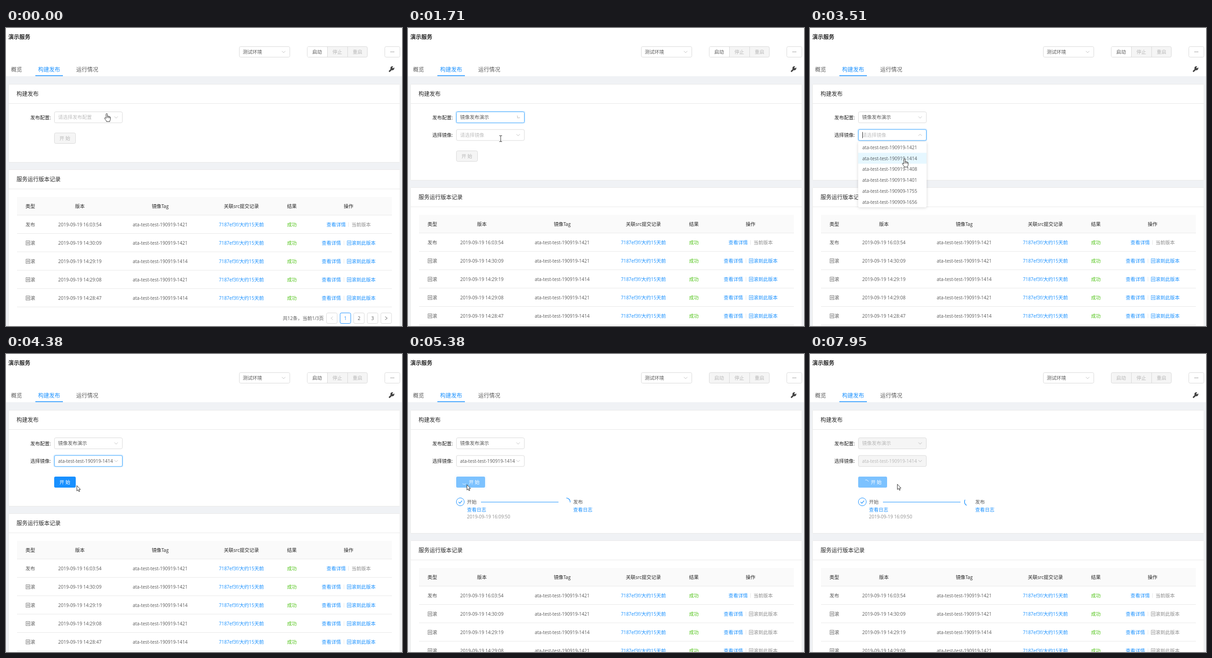
These frames come from a looping animation (863x649 px, 8000 ms). An HTML page:

```html
<!DOCTYPE html>
<html lang="zh-CN">
<head>
<meta charset="utf-8">
<title>演示服务</title>
<style>
html, body { margin: 0; width: 100%; height: 100%; overflow: hidden; background: #f0f2f5; }
svg { display: block; width: 863px; height: 649px; }
text { font-family: "Open Sans", "Noto Sans CJK SC", "Noto Sans CJK", "Noto Sans CJK JP", sans-serif; white-space: pre; }
.drop { filter: drop-shadow(0 1.5px 3px rgba(0,0,0,.16)); }
</style>
</head>
<body>
<svg id="stage" viewBox="0 0 863 649" xmlns="http://www.w3.org/2000/svg">
  <g id="page"></g>
  <g id="head"></g>
  <g id="build"></g>
  <g id="log"></g>
  <g id="form"></g>
  <g id="pointer"></g>
</svg>
<script>
const LOOP = 8000;
const BLUE = '#1890ff', HOVER = '#40a9ff', LINE = '#e8e8e8', EDGE = '#d9d9d9', GREY = '#f5f5f5';
const DARK = 'rgba(0,0,0,.85)', BODY = 'rgba(0,0,0,.65)', SOFT = 'rgba(0,0,0,.45)', PALE = 'rgba(0,0,0,.25)';
const $ = id => document.getElementById(id);

// moments at which the interface changes
const AT = {
  hover: 190, open1: 400, second: 1090, pick1: 1500, open2: 2300, third: 3370,
  pick2: 3590, load: 5000, steps: 5310, lock: 5460
};

// y is the visual middle of the line
function text(x, y, s, { size = 10.5, fill = BODY, anchor = 'start', weight = 400 } = {}) {
  const runs = s.replace(/[\x20-\x7e]+/g, m => `<tspan font-size="${size * .952}">${m}</tspan>`);
  return `<text x="${x}" y="${y + size * .37}" font-size="${size}" fill="${fill}" text-anchor="${anchor}" font-weight="${weight}">${runs}</text>`;
}
const mid = (x, y, s, o) => text(x, y, s, { anchor: 'middle', ...o });
const rect = (x, y, w, h, fill, stroke = 'none', r = 0) =>
  `<rect x="${x}" y="${y}" width="${w}" height="${h}" rx="${r}" fill="${fill}" stroke="${stroke}"/>`;
const path = (d, stroke, width = 1, more = '') =>
  `<path d="${d}" fill="none" stroke="${stroke}" stroke-width="${width}" ${more}/>`;
const hline = (x1, x2, y, c = LINE) => path(`M${x1} ${y}H${x2}`, c);
const chevron = (x, y, turn = 0) =>
  path('M-3.7 -1.9L0 1.9L3.7 -1.9', 'rgba(0,0,0,.28)', .9, `transform="translate(${x} ${y}) rotate(${turn})"`);
const clamp = v => Math.max(0, Math.min(1, v));
const span = (t, from, length) => clamp((t - from) / length);
const smooth = p => p * p * (3 - 2 * p);

function drawPage() {
  const wrench =
    path('M835.8 94.2L841 89', '#444', 3.2, 'stroke-linecap="round"') +
    '<circle cx="842" cy="87.6" r="4.3" fill="#444"/>' +
    path('M842.6 87L847 82.6', '#fff', 2.8);
  const dots = [839, 842, 845].map(x => `<circle cx="${x}" cy="52" r=".8" fill="#555"/>`).join('');
  $('page').innerHTML =
    rect(0, 0, 863, 649, '#f0f2f5') + rect(0, 0, 863, 105, '#fff') +
    text(5, 20, '演示服务', { size: 12, fill: DARK, weight: 700 }) +
    text(11, 91, '概览', { size: 12 }) +
    text(70, 91, '构建发布', { size: 12, fill: BLUE }) +
    text(153, 91, '运行情况', { size: 12 }) +
    rect(64, 103, 60, 1.6, BLUE) +
    rect(508.5, 40.5, 110, 23, '#fff', EDGE, 3) +
    text(516, 52, '测试环境') + chevron(605, 52) +
    rect(825.5, 40.5, 33, 23, '#fff', EDGE, 3) + dots + wrench;
}

function drawHead(busy) {
  $('head').innerHTML =
    rect(656.5, 40.5, 131, 23, GREY, EDGE, 3) +
    (busy ? '' : rect(657, 41, 43, 22, '#fff', 'none', 2)) +
    path('M700.5 40.5V63.5M744.5 40.5V63.5', EDGE) +
    mid(678, 52, '启动', { fill: busy ? PALE : BODY }) +
    mid(722, 52, '停止', { fill: PALE }) +
    mid(766, 52, '重启', { fill: PALE });
}

function drawLog(shift, busy) {
  const cols = [53, 161, 336, 513, 623, 746.5];
  const names = ['类型', '版本', '镜像Tag', '关联src提交记录', '结果', '操作'];
  const rows = [['16:03:54', 1421], ['14:30:09', 1421], ['14:29:19', 1414], ['14:29:08', 1421], ['14:28:47', 1414]];
  let s = rect(5.5, 308.5, 853, 360, '#fff', LINE, 1) +
    text(23, 329.5, '服务运行版本记录', { size: 12, fill: DARK }) +
    hline(6, 858, 350.5) + rect(24, 368, 817, 39, '#fafafa') + hline(24, 841, 407.5);
  names.forEach((n, i) => s += mid(cols[i], 388, n, { fill: DARK, weight: 500 }));
  rows.forEach(([time, tag], i) => {
    const y = 428 + i * 40, x = i ? 688 : 698.5;
    s += mid(cols[0], y, i ? '回滚' : '发布') +
      mid(cols[1], y, '2019-09-19 ' + time) +
      mid(cols[2], y, 'ata-test-test-190919-' + tag) +
      mid(cols[3], y, '7187ef3f/大约15天前', { fill: BLUE }) +
      mid(cols[4], y, '成功', { fill: '#52c41a' }) +
      text(x, y, '查看详情', { fill: BLUE }) +
      path(`M${i ? 736.5 : 746.5} ${y - 5}V${y + 5}`, LINE) +
      text(x + 54.5, y, i ? '回滚到此版本' : '当前版本', { fill: i && !busy ? BLUE : SOFT }) +
      hline(24, 841, y + 19.5);
  });
  s += text(603, 632, '共12条，当前1/3页');
  for (let i = 0; i < 5; i++) {
    const x = 698.5 + i * 29.6;
    s += rect(x, 620.5, 23.2, 23, '#fff', i === 1 ? BLUE : EDGE, 3);
    if (i > 0 && i < 4) s += mid(x + 11.6, 632, String(i), { fill: i === 1 ? BLUE : BODY, weight: i === 1 ? 500 : 400 });
  }
  s += path('M712.3 628.5L708.3 632L712.3 635.5', PALE) + path('M826.3 628.5L830.8 632L826.3 635.5', '#555');
  $('log').innerHTML = s;
  $('log').setAttribute('transform', `translate(0 ${shift})`);
}

function drawBuild(shift) {
  $('build').innerHTML = rect(5.5, 122.5, 853, 170 + shift, '#fff', LINE, 1) +
    text(23, 144, '构建发布', { size: 12, fill: DARK }) + hline(6, 858, 164.5);
}

function select(y, label, value, o) {
  const glow = o.focus ? path(`M107 ${y - 1}h145a2.7 2.7 0 0 1 2.7 2.7v20a2.7 2.7 0 0 1 -2.7 2.7h-145a2.7 2.7 0 0 1 -2.7 -2.7v-20a2.7 2.7 0 0 1 2.7 -2.7z`, 'rgba(24,144,255,.2)', 1.6) : '';
  return text(53, y + 12.5, label + ':', { fill: DARK }) + glow +
    rect(105.5, y, 148, 24, o.off ? GREY : '#fff', o.focus || o.hover ? HOVER : EDGE, 3) +
    text(113.5, y + 12, value, { fill: o.off ? PALE : o.hint ? '#bfbfbf' : BODY }) +
    chevron(240, y + 12, o.turn);
}

// how far a list is unfolded
function unfold(t, from, to) {
  if (t < to) return 1 - Math.pow(1 - span(t, from, 200), 5);
  return 1 - Math.pow(span(t, to, 200), 5);
}
const turn = (t, from, to) => 180 * (Math.pow(span(t, from, 300), .8) - smooth(span(t, to, 300)));

function list(y, step, items, active, open) {
  if (open <= 0) return '';
  let s = rect(0, 0, 149, step * items.length, '#fff', 'none', 3) + rect(0, step * active, 149, step, '#e6f7ff');
  items.forEach((n, i) => s += text(9, step * (i + .5), n));
  return `<g class="drop" opacity="${open}" transform="translate(105 ${y}) scale(1 ${.8 + .2 * open})">${s}</g>`;
}

function spinner(x, y, r, width, color, angle) {
  return path(`M0 ${-r}A${r} ${r} 0 0 1 ${r} 0`, color, width,
    `stroke-linecap="round" transform="translate(${x} ${y}) rotate(${angle})"`);
}

function button(t, y, over) {
  const ready = t >= AT.pick2, busy = t >= AT.load;
  if (!ready) return rect(105.5, y + .5, 46, 23, GREY, EDGE, 3) + text(116.5, y + 12.5, '开 始', { fill: PALE });
  const p = span(t, AT.load - 20, 650), g = 4.5 * (1 - Math.pow(1 - p, 3)), w = busy ? 63 : 47;
  const wave = p > 0 && p < 1
    ? `<rect x="${105 - g}" y="${y - g}" width="${w + 2 * g}" height="${24 + 2 * g}" rx="${3 + g}" fill="${BLUE}" opacity="${.2 * (1 - p) * (1 - p)}"/>` : '';
  return wave + rect(105, y, w, 24, busy ? '#7cc2ff' : over ? HOVER : BLUE, 'none', 3) +
    (busy ? spinner(122.5, y + 12, 4.9, .8, '#fff', 135 + (t - 5380) * .36) : '') +
    text(busy ? 132.5 : 116.5, y + 12.5, '开 始', { fill: '#fff' });
}

function steps(t) {
  return `<circle cx="114" cy="322" r="8.6" fill="#fff" stroke="${BLUE}"/>` +
    path('M110.3 322.2L113 325L118 319.3', BLUE, 1.2) +
    text(128.5, 322, '开始') + hline(159, 328, 322.5, BLUE) +
    text(128.5, 339, '查看日志', { fill: BLUE }) +
    text(128.5, 354.5, '2019-09-19 16:09:50', { fill: SOFT }) +
    spinner(345, 322, 8.4, 1.3, BLUE, (t - 5370) * .36) +
    text(360, 322, '发布') + text(360, 339, '查看日志', { fill: BLUE });
}

function drawForm(t, over) {
  const picked = t >= AT.pick1, chosen = t >= AT.pick2, locked = t >= AT.lock;
  let s = select(182.5, '发布配置', picked ? '镜像发布演示' : '请选择发布配置', {
    hint: !picked, off: locked, hover: t >= AT.hover && t < AT.open2,
    focus: t >= AT.open1 && t < AT.open2, turn: turn(t, AT.open1, AT.pick1)
  });
  if (picked) {
    s += select(221, '选择镜像', chosen ? 'ata-test-test-190919-1414' : '请选择镜像', {
      hint: !chosen, off: locked, hover: t >= 1750 && t < AT.load,
      focus: t >= AT.open2 && t < AT.load - 20, turn: turn(t, AT.open2, AT.pick2)
    });
    const blink = t >= AT.open2 && t < AT.pick2 && Math.floor((t - 2350) / 500) % 2 === 0;
    if (blink) s += path('M114.5 226.5V240', '#333');
  }
  s += button(t, picked ? 267 : 228, over);
  if (t >= AT.steps) s += steps(t);
  s += list(209, 24, ['演示测试环境发布', '镜像发布演示'], t < AT.second ? 0 : 1, unfold(t, AT.open1, AT.pick1));
  const tags = ['0919-1421', '0919-1414', '0919-1408', '0919-1401', '0909-1755', '0909-1656'];
  s += list(248, 23.75, tags.map(n => 'ata-test-test-19' + n), t < AT.third ? 0 : 1, unfold(t, AT.open2, AT.pick2));
  $('form').innerHTML = s;
}

// time, x, y
const route = [
  [0, 219.5, 186], [150, 219.5, 186], [230, 217, 178], [440, 217, 178], [880, 206, 224], [960, 206, 224],
  [1180, 202, 241], [1700, 202, 241], [2150, 190.5, 226], [2700, 190.5, 226], [3120, 206, 285],
  [4040, 206, 285], [4370, 154, 286], [4400, 154, 286], [4780, 128, 284], [5420, 128, 284],
  [5800, 190, 283], [LOOP, 190, 283]
];
function place(t) {
  let i = 1;
  while (i < route.length - 1 && t >= route[i][0]) i++;
  const [a, ax, ay] = route[i - 1], [b, bx, by] = route[i];
  const p = smooth(clamp((t - a) / (b - a)));
  return [ax + (bx - ax) * p, ay + (by - ay) * p];
}
const HAND = 'M-1.5 11V1.5Q-1.5 .3 0 .3T1.4 1.5V6.6Q1.7 5.5 2.8 5.6T4 7Q4.3 6.1 5.3 6.3T6.3 7.7Q6.7 7 7.3 7.3T8 8.6V12.3Q8 14.5 6.7 16.3V17.8H-.6V16.4Q-3 13.8-4.6 11.1Q-5 9.9-4.1 9.4T-1.5 11ZM1.4 6.6V10M4 7V10.2M6.3 7.7V10.4';
const ARROW = 'M.4 .6V12.2L3 9.8L4.9 13.8L6.7 13L4.9 9.1H8.3Z';
const BEAM = 'M-3 -6.5H-1Q0 -6.5 0 -5.5Q0 -6.5 1 -6.5H3M0 -5.5V5.5M-3 6.5H-1Q0 6.5 0 5.5Q0 6.5 1 6.5H3';

function drawPointer(t, x, y, over) {
  let shape = ARROW;
  if (t < 1700 || (t > 2500 && t < AT.pick2 + 150 && y > 248) || (over && t < AT.load)) shape = HAND;
  else if (t < 3200) shape = BEAM;
  $('pointer').innerHTML = `<path d="${shape}" transform="translate(${x} ${y})" fill="${shape === BEAM ? 'none' : '#fff'}" stroke="#222" stroke-width=".95" stroke-linejoin="round"/>`;
}

let layout = '';
function draw(t) {
  const busy = t >= AT.steps, shift = busy ? 98 : t >= AT.pick1 ? 39 : 0;
  if (layout !== busy + ':' + shift) {
    layout = busy + ':' + shift;
    drawHead(busy);
    drawBuild(shift);
    drawLog(shift, busy);
  }
  const [x, y] = place(t);
  const over = t > 4050 && x < 152;
  drawForm(t, over);
  drawPointer(t, x, y, over);
}

drawPage();
const start = performance.now();
function tick() {
  draw((performance.now() - start) % LOOP);
  requestAnimationFrame(tick);
}
tick();
</script>
</body>
</html>
```
